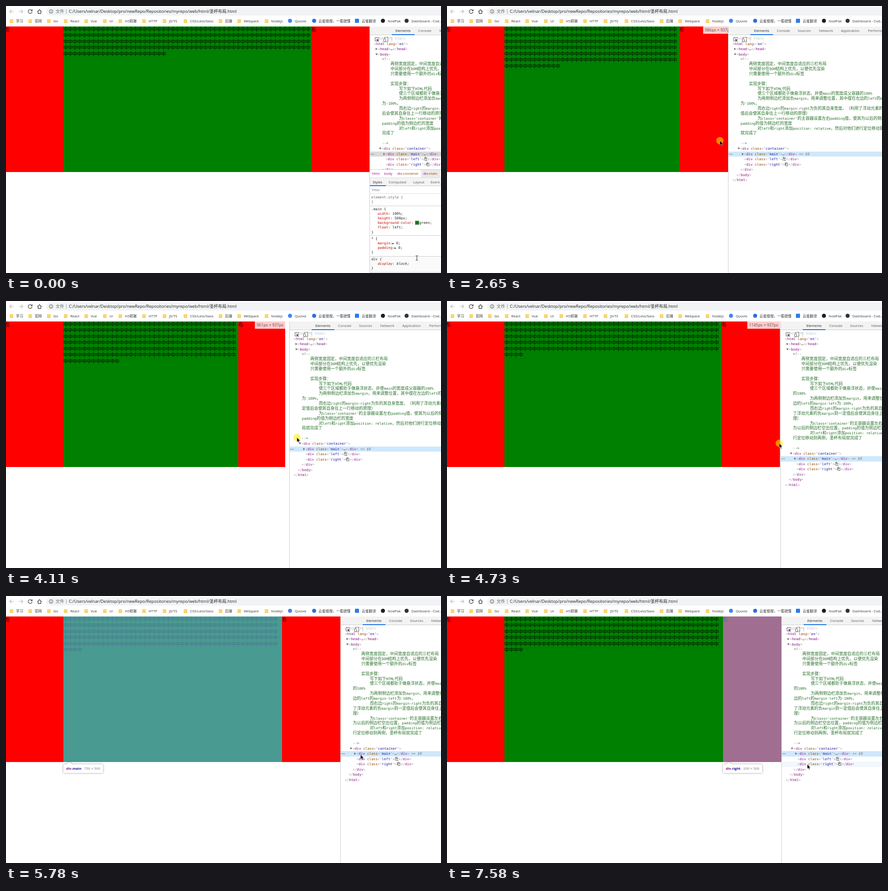
An HTML page for the animation above (8 s loop, 955 by 587 pixels).

```html
<!DOCTYPE html>
<html lang="zh">
<head>
<meta charset="utf-8">
<title>圣杯布局</title>
<style>
html, body { margin: 0; width: 955px; height: 587px; overflow: hidden; background: #fff; }
body { position: relative; font: 7.8px 'Open Sans', 'Noto Sans CJK SC', 'Noto Sans CJK', sans-serif; color: #333; text-spacing-trim: space-all; }
body * { box-sizing: border-box; }
body > div, .at, .at > *, .tip, svg { position: absolute; white-space: pre; }
.hide { display: none !important; }

/* browser bars */
#bar { left: 88px; top: 3px; width: 900px; height: 18px; border-radius: 9px; background: #f1f3f4; }
#url { left: 138px; top: 5px; font-size: 9.25px; line-height: 14px; color: #222; }
#marks { left: 0; top: 23px; width: 955px; height: 22px; overflow: hidden; line-height: 20px; }
.folder { width: 8px; height: 8px; top: 6px; background: #fcd670; border-radius: 1px; border-bottom: 1px solid #e9bd4d; }
.dot { width: 9px; height: 9px; top: 5px; border-radius: 50%; }

/* page */
#page { left: 0; top: 45px; height: 320px; overflow: hidden; font-size: 10.24px; line-height: 13.44px; color: #000; }
#page div { position: absolute; top: 0; height: 320px; }
#left, #right { width: 128px; background: #f00; }
#left { left: -2px; }
#main { left: 126px; background: #008000; word-break: break-all; white-space: normal; }
.glow { background: rgba(111,168,220,.66); }
.pad { background: rgba(147,196,125,.55); }
#size { top: 45px; height: 16px; padding: 0 4px; font-size: 8.7px; line-height: 16px; background: rgba(255,255,255,.8); color: #555; }
#tip { top: 370px; height: 19px; padding: 0 6px; line-height: 19px; background: #fff; border-radius: 2px; filter: drop-shadow(0 0 2px rgba(0,0,0,.4)); color: #777; }
#tip::before { content: ''; position: absolute; left: 7px; top: -5px; border: 6px solid transparent; border-top: 0; border-bottom: 5px solid #fff; }
#tip b { color: #1a1aa6; margin-right: 6px; }
#tip b u { color: #881280; text-decoration: none; }

/* developer tools */
#panel { top: 45px; right: 0; height: 542px; overflow: hidden; background: #fff; border-left: 1px solid #ccc; }
.tabs { left: 0; width: 640px; height: 19px; line-height: 19px; background: #f3f3f3; border-bottom: 1px solid #ccc; color: #5a5a5a; }
.tabs .on { color: #222; }
.line { height: 2px; background: #1a73e8; }
.mono { font: 7.7px/10.24px 'DejaVu Sans Mono', 'Noto Sans CJK SC', monospace; color: #222; }
#tree { position: absolute; top: 21.2px; left: 0; width: 640px; }
.row { position: relative; height: 11.52px; line-height: 11.52px; white-space: pre; }
.row.pick { background: #cfe8fc; }
.row.pick.idle { background: #dadada; }
.row.over { background: #f2f7fd; }
.row svg { top: 3.2px; }
.row em { color: #777; }
#note { margin-left: 26.6px; white-space: pre-wrap; line-height: 10.88px; color: #236e25; }
.mono i { font-size: 8.96px; font-style: normal; line-height: 0; }
.p { color: #a894a6; } .t { color: #881280; } .a { color: #994500; } .v { color: #1a1aa6; }
#styles { left: 0; top: 314px; width: 640px; height: 230px; background: #fff; border-top: 1px solid #ccc; }
.rule { left: 0; width: 640px; padding-left: 3px; border-bottom: 1px solid #ccc; }
.rule s { color: #c80000; text-decoration: none; }
.rule .chip { display: inline-block; width: 7px; height: 7px; margin: 0 1px -1px 0; background: #008000; outline: .5px solid #888; }
#ring { width: 16px; height: 16px; margin: -8px; border-radius: 50%; background: rgba(255,240,0,.55); }
#cursor svg { overflow: visible; left: 0; top: 0; }
</style>
</head>
<body>
<div id="bar"></div>
<svg width="140" height="24" fill="none" stroke="#b6b6b6" stroke-width="1.1">
  <path d="M17 12H8M12 8L8 12L12 16M28 12H37M33 8L37 12L33 16"/>
  <path stroke="#444" stroke-width="1.3" d="M56.5 9.5A4.3 4.3 0 1 0 57.3 13M57.5 7.5V10.7H54.2M69 12.5L73.500 8L78 12.500M70.500 11.5V16.500H76.500V11.500"/>
  <g stroke="#555" stroke-width="1"><circle cx="99" cy="12" r="4"/><path d="M99 11.500V14.500M99 9.500V10.500"/></g>
  <path stroke="#aaa" d="M132.500 7V17"/>
</svg>
<div style="left:109px;top:5px;font-size:9.2px;line-height:14px;color:#666">文件</div>
<div id="url">C:/Users/velnar/Desktop/pro/newRepo/Repositories/myrepo/web/html/圣杯布局.html</div>
<div id="marks" class="at"></div>

<div id="page">
  <div id="main"></div><div id="left">左</div><div id="right">右</div>
  <div id="glowL"></div><div id="glowM" class="glow"></div><div id="glowR"></div>
</div>
<div id="size"></div>
<div id="tip"></div>

<div id="panel">
  <div class="tabs at" id="tabs" style="top:0"></div>
  <div id="tree" class="mono"></div>
  <div id="styles" class="at">
    <div style="left:112px;top:0;width:42px;height:17px;background:#eaeaea"></div>
    <div class="at" id="crumbs" style="left:0;top:0;line-height:17px"></div>
    <div class="tabs at" id="tabs2" style="top:17px;border-top:1px solid #ddd"></div>
    <div style="left:4px;top:38px;line-height:13px;color:#777">Filter</div>
    <div style="left:0;top:52px;width:640px;height:1px;background:#ddd"></div>
    <div class="rule mono" style="top:56px;height:24px;color:#666">element.style {
}</div>
    <div class="rule mono" style="top:81.500px;height:63px">.main {
   <s>width</s>: 100%;
   <s>height</s>: 500px;
   <s>background-color</s>: <span class="chip"></span>green;
   <s>float</s>: left;
}</div>
    <div class="rule mono" style="top:146.500px;height:44px">* {
   <s>margin</s>:<span style="font-size:6px">▶</span> 0;
   <s>padding</s>:<span style="font-size:6px">▶</span> 0;
}</div>
    <div class="rule mono" style="top:191px;height:35px;padding-top:1px;background:#fafafa;font-style:oblique">div {
   <s>display</s>: block;
}</div>
  </div>
</div>

<div id="ring"></div>
<div id="cursor">
  <svg id="arrow" width="8" height="13"><path d="M0 0V10L2.300 8L4 11.800L5.500 11.100L4 7.500H7Z" stroke="#fff" stroke-width=".5"/></svg>
  <svg id="beam" width="1" height="1" fill="none" stroke="#222"><path d="M-2.500 -5H-.5L0 -4.500L.5 -5H2.500M0 -4.500V4.500M-2.500 5H-.5L0 4.500L.5 5H2.500"/></svg>
  <svg id="resize" width="1" height="1" stroke="#000"><path d="M-5 0H5M-1 -4V4M1 -4V4M-6 0L-3.500 -2V2ZM6 0L3.500 -2V2Z" stroke-width=".9"/></svg>
</div>

<script>
const $ = id => document.getElementById(id);
const LOOP = 8000, SCALE = .64;

// static content
const put = (x, text, cls = '') => `<span class="${cls}" style="left:${x}px">${text}</span>`;
const folders = [[8, '学习'], [49, '官网'], [90, 'Go'], [127, 'React'], [172, 'Vue'], [213, 'UI'], [247, 'H5前端'], [299, 'HTTP'],
  [344, 'JS/TS'], [390, 'CSS/Less/Sass'], [467, '后端'], [508, 'Webpack'], [568, 'Nodejs']];
const sites = [[619, 634, '#4285f4', 'Quovix'], [672, 686, '#2f6fe0', '云雀搜搜，一看就懂'], [766, 781, '#2b7de9', '云雀翻译'],
  [823, 838, '#1b1f23', 'NodPak'], [875, 890, '#333', 'Dashboard - Cod...']];
$('marks').innerHTML =
  folders.map(([x, s]) => put(x, '', 'folder') + put(x + 14, s)).join('') +
  sites.map(([x, tx, c, s], i) =>
    `<span class="dot" style="left:${x}px;background:${c};${i == 2 ? 'border-radius:1px' : ''}"></span>` + put(tx, s)).join('');

$('main').textContent = '中'.repeat(234);

const tabs = [[56, 'Elements'], [106, 'Console'], [152, 'Sources'], [198.5, 'Network'], [247, 'Application'],
  [306, 'Performance'], [369, 'Memory'], [417, 'Security'], [470, 'Pagechecks']];
$('tabs').innerHTML = tabs.map(([x, s], i) => put(x, s, i ? '' : 'on')).join('') +
  `<span class="line" style="left:48px;top:17px;width:50px"></span>
  <svg width="50" height="19" fill="none" stroke="#555"><path d="M14 13H7.500V5.500H15.500V8"/><path fill="#555" stroke="none" d="M10.500 8L16.500 10.500L14 11.300L16 14L15 14.700L13 12L11.500 14Z"/><path d="M28 7V4.500H35.500V14H31.500M26.500 8H30.500V14.500H26.500Z"/><path stroke="#ccc" d="M44 4V15"/></svg>`;
$('tabs2').innerHTML = [[6, 'Styles'], [41, 'Computed'], [95, 'Layout'], [133, 'Event Listeners']]
  .map(([x, s], i) => put(x, s, i ? '' : 'on')).join('') + '<span class="line" style="left:0;top:16px;width:35px"></span>';
$('crumbs').innerHTML = put(4.5, 'html', 't') + put(31, 'body', 't') +
  put(60, '<span class="t">div</span>.container', 'a') + put(117, '<span class="t">div</span>.main', 'a');

const cjk = s => s.replace(/[\u3000-\u9fff\uff00-\uffef]+/g, '<i>$&</i>');
const p = s => `<span class="p">${s}</span>`;
const open = (tag, attr, val) => p('&lt;') + `<span class="t">${tag}</span>` +
  (attr ? ` <span class="a">${attr}</span>${p('="')}<span class="v">${val}</span>${p('"')}` : '') + p('&gt;');
const shut = tag => p('&lt;/') + `<span class="t">${tag}</span>` + p('&gt;');
const fold = (x, isOpen) => `<svg style="left:${x}px" width="5" height="5" fill="#666"><path d="${isOpen ? 'M0 .5H5L2.500 4.500Z' : 'M.5 0V5L4.500 2.500Z'}"/></svg>`;
const row = (x, html, id = '', extra = '') => `<div class="row" id="${id}" style="padding-left:${x}px">${extra}${html}</div>`;
const note = `<!--
    两侧宽度固定，中间宽度自适应的三栏布局
    中间部分在DOM结构上优先，以便优先渲染
    只需要使用一个额外的div标签

    实现步骤：
        写下如下HTML代码
        使三个区域都处于做悬浮状态，并使main的宽度成父容器的100%
        为两侧侧边栏添加负margin，用来调整位置，其中摆在左边的left的margin-left为-100%，
        而右边right的margin-right为负的其自身宽度。（利用了浮动元素的负margin到一定值后会使其自身往上一行移动的原理）
        为class='container'的主容器设置左右padding值，使其为以后的侧边栏空出位置，padding的值为侧边栏的宽度
        对left和right添加position: relative，然后对他们进行定位移动到两侧，圣杯布局就完成了

-->`;
$('tree').innerHTML =
  row(9, '<span style="color:#c0c0c0">&lt;!DOCTYPE html&gt;</span>') +
  row(9, open('html', 'lang', 'en')) +
  row(17.5, open('head') + '…' + shut('head'), '', fold(11.5)) +
  row(17.5, open('body'), '', fold(11.5, true)) +
  `<div id="note">${cjk(note.replace(/</g, '&lt;'))}</div>` +
  row(26, open('div', 'class', 'container'), 'rowC', fold(19.5, true)) +
  row(34.5, open('div', 'class', 'main') + '…' + shut('div') + '<em> == $0</em>', 'rowM', fold(28.5) +
    '<svg style="left:1px;top:5px" width="8" height="2" fill="#666"><path d="M0 0h1.500v1.500H0zM3 0h1.500v1.500H3zM6 0h1.500v1.500H6z"/></svg>') +
  row(34.5, open('div', 'class', 'left') + cjk('左') + shut('div'), 'rowL') +
  row(34.5, open('div', 'class', 'right') + cjk('右') + shut('div'), 'rowR') +
  row(26, shut('div')) + row(17.5, shut('body')) + row(9, shut('html'));
$('rowM').classList.add('pick');

// motion: [time, values...]
const edge = [[0, 798], [2040, 798], [2075, 792], [2110, 792], [2250, 765], [2600, 640], [3140, 393], [3210, 383],
  [3430, 363], [3520, 363], [3750, 440], [4080, 612], [4110, 622], [4310, 685], [4600, 728], [4800, 734]];
const mouse = [[0, 902, 554], [69, 902, 554], [195, 764, 361], [390, 764, 361], [1160, 795, 319], [1230, 795, 317],
  [1429, 795, 317], [1430, 798, 321], [1830, 798, 321], [2110, 769, 314.5], [2600, 620, 298], [3210, 369, 273.5],
  [3430, 365, 272], [3520, 365, 272], [4110, 638.5, 300], [4310, 695, 306], [4800, 735, 314], [5090, 737, 316],
  [5180, 752, 336], [5290, 767, 354], [5600, 775, 351], [5920, 781, 347], [6060, 781, 347], [6210, 782, 345],
  [6455, 782, 345], [6610, 788, 353], [6800, 790, 358], [7230, 791, 361], [7580, 791, 370]];

function at(keys, t) {
  const i = keys.findIndex(k => k[0] > t);
  if (i < 0) return keys[keys.length - 1].slice(1);
  const a = keys[i - 1] || keys[0], b = keys[i], f = a === b ? 0 : (t - a[0]) / (b[0] - a[0]);
  return a.slice(1).map((v, j) => v + (b[j + 1] - v) * f);
}
const during = (t, from, to) => t >= from && t < to;
const show = (id, on) => $(id).classList.toggle('hide', !on);
const place = (id, x, w) => { $(id).style.left = x + 'px'; if (w) $(id).style.width = w + 'px'; };

function hovered(t) {
  if (during(t, 5160, 5225)) return 'C';
  if (during(t, 5225, 6460)) return 'M';
  if (during(t, 6680, 7300)) return 'L';
  return t >= 7370 ? 'R' : '';
}

function draw(now) {
  const t = now % LOOP;
  const x = Math.round(at(edge, t)[0]);
  const wide = Math.round(at(edge, Math.max(0, t - 28))[0]); // the page trails the divider
  const main = Math.max(600 * SCALE, wide - 254);
  const right = 126 + main;

  place('page', 0, Math.min(wide, x));
  place('main', 126, main);
  place('right', right);
  place('panel', x);
  const side = x < 770;
  const limit = side ? 1022 + (x - 622) * .045 : 1217;
  $('note').style.width = limit - x - 27.6 + 'px';
  show('styles', !side);
  $('rowM').classList.toggle('idle', t < 1830);

  const sizing = during(t, 2040, 5160);
  show('size', sizing);
  $('size').textContent = Math.round((wide + 2) / SCALE) + 'px × 937px';
  $('size').style.right = 955 - wide + 'px';
  $('size').style.clipPath = `inset(0 ${Math.max(0, wide - x)}px 0 0)`;

  const h = hovered(t);
  place('glowL', -2, 128);
  place('glowM', 126, main);
  place('glowR', right, 128);
  $('glowL').className = h == 'L' ? 'glow' : 'pad';
  $('glowR').className = h == 'R' ? 'glow' : 'pad';
  show('glowL', h == 'L' || h == 'C');
  show('glowM', h == 'M' || h == 'C');
  show('glowR', h == 'R' || h == 'C');
  for (const k of 'CLR') $('row' + k).classList.toggle('over', h == k);
  show('tip', h);
  if (h) {
    const [name, left, width] = { C: ['container', 1, 1150], M: ['main', 126, 750], L: ['left', 1, 200], R: ['right', right, 200] }[h];
    $('tip').innerHTML = `<b><u>div</u>.${name}</b>${width} × 500`;
    place('tip', left);
  }

  const [mx, my] = at(mouse, t);
  const spot = `translate(${mx}px,${my}px)`;
  $('cursor').style.cssText = $('ring').style.cssText = `left:0;top:0;transform:${spot}`;
  show('ring', during(t, 1830, 5100));
  const beam = t < 150, resize = during(t, 1430, 1830);
  show('beam', beam);
  show('resize', resize);
  show('arrow', !beam && !resize);
}

function tick() {
  draw(performance.now());
  requestAnimationFrame(tick);
}
tick();
</script>
</body>
</html>
```
